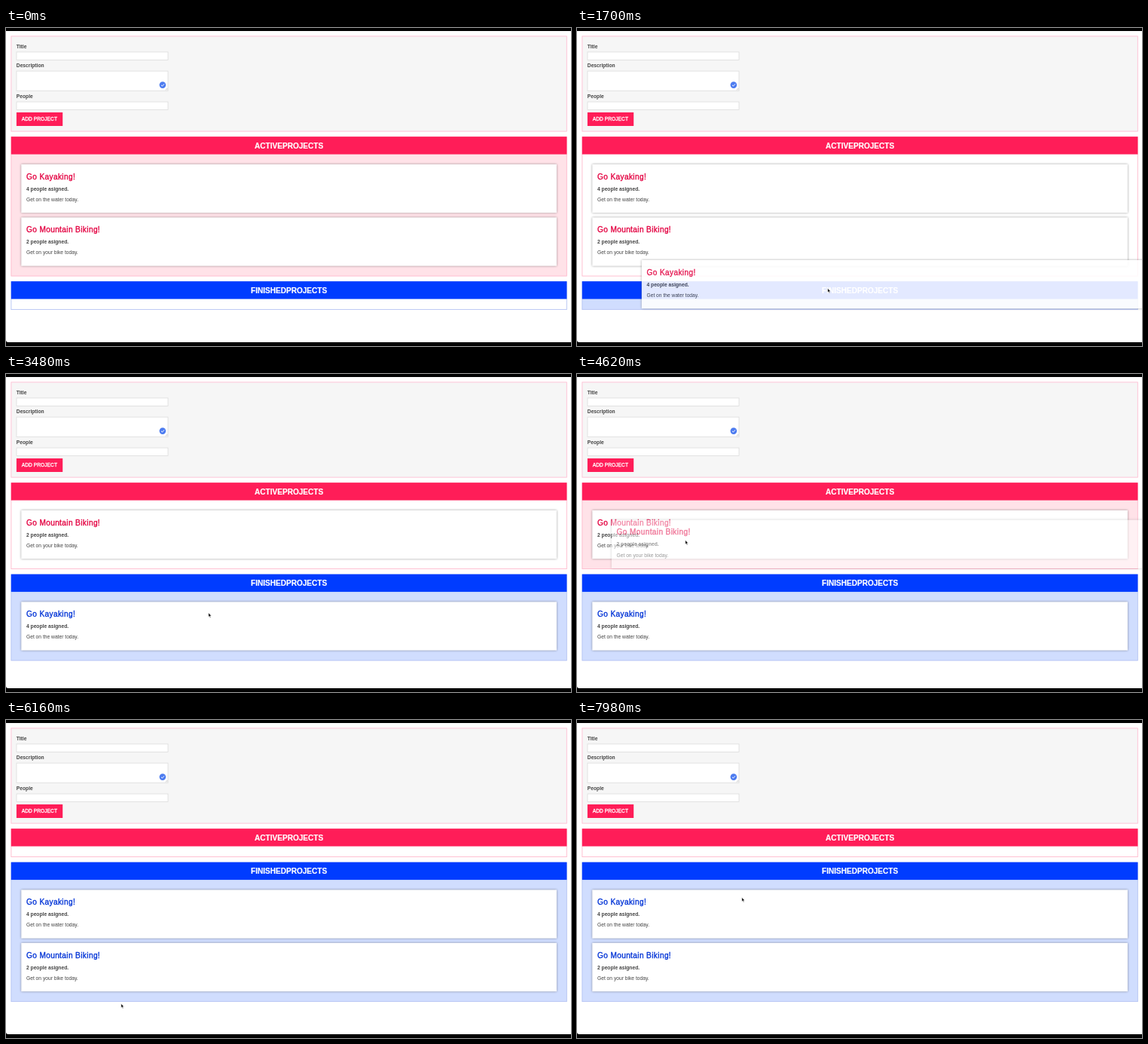
These frames come from a looping animation (750 px wide and 422 px high, 8000 ms). An HTML page:

```html
<!DOCTYPE html>
<html lang="en">
<head>
<meta charset="utf-8">
<title>Project board</title>
<style>
  html, body { margin: 0; width: 100%; height: 100%; overflow: hidden; background: #000; }
  svg { display: block; width: 100vw; height: 100vh; }
  text { font: 6.69px "Liberation Sans", Arial, sans-serif; fill: #444; }
  .bold { font-weight: bold; }
  .title { font-size: 10.06px; letter-spacing: .4px; stroke-width: .35; }
  .head { font-size: 10.06px; font-weight: bold; fill: #fff; stroke: #fff; stroke-width: .2; text-anchor: middle; }
  .button { fill: #fff; stroke: #fff; stroke-width: .3; }
  .field { fill: #fff; stroke: #dcdcdc; stroke-width: .8; }
  .card rect { fill: #fff; filter: drop-shadow(.5px .7px 1.6px rgba(0, 0, 0, .4)); }
</style>
</head>
<body>
<svg id="stage" viewBox="0 0 750 422" preserveAspectRatio="none">
  <path d="M0 4H750V417H3Q0 417 0 414Z" fill="#fff"/>
  <rect x="6.9" y="10.9" width="737.4" height="126.2" fill="#f6f6f6" stroke="#ffbfd3" stroke-width=".9"/>
  <g id="form"></g>
  <path d="M211.8 82.4L214.4 79.8M213.4 82.4L214.4 81.4" stroke="#999" stroke-width=".5"/>
  <circle cx="207.9" cy="75.6" r="4.3" fill="#4c7bf0"/>
  <path d="M205.9 75.7L207.4 77.1L210 74.3" fill="none" stroke="#fff"/>
  <rect x="13.9" y="112" width="61.3" height="18" fill="#ff1d58"/>
  <text class="button" x="20.8" y="123.3">ADD PROJECT</text>
</svg>
<script>
const LOOP = 8000;
const LEFT = 20.3, TOP = 144.2, GAP = 7.1, PITCH = 70.5, INSET = 36.7;
const RED = '#e30040', BLUE = '#0033d6';
const stage = document.getElementById('stage');

function add(parent, tag, attrs = {}, text = '') {
  const el = document.createElementNS('http://www.w3.org/2000/svg', tag);
  for (const k in attrs) el.setAttribute(k, attrs[k]);
  el.textContent = text;
  parent.appendChild(el);
  return el;
}

const move = (el, x, y) => el.setAttribute('transform', `translate(${x.toFixed(2)} ${y.toFixed(2)})`);
const show = (el, on) => el.setAttribute('visibility', on ? 'visible' : 'hidden');

function makeForm(form) {
  let y = 26.5;
  for (const [label, height] of [['Title', 10.5], ['Description', 26.2], ['People', 10.5]]) {
    add(form, 'text', { class: 'bold', x: 13.8, y }, label);
    add(form, 'rect', { class: 'field', x: 14, y: y + 5.4, width: 201, height });
    y += height + 14.7;
  }
}

function makeZone(name, strong, soft, line) {
  const g = add(stage, 'g');
  const body = add(g, 'rect', { x: 6.9, y: .4, width: 737.4, stroke: line, 'stroke-width': .9 });
  add(g, 'rect', { x: 6.8, width: 737.6, height: 23.4, fill: strong });
  add(g, 'text', { class: 'head', x: 375.6, y: 15.5 }, name);
  return { g, body, soft };
}

function makeCard(title, people, note) {
  const g = add(stage, 'g', { class: 'card' });
  add(g, 'rect', { width: 710.6, height: 64.3 });
  const h = add(g, 'text', { class: 'title', x: 6.7, y: 19.7 }, title);
  add(g, 'text', { class: 'bold', x: 6.7, y: 34.9 }, `${people} people asigned.`);
  add(g, 'text', { x: 6.7, y: 49.1 }, note);
  return { g, h };
}

function tint(card, color) {
  card.h.style.fill = card.h.style.stroke = color;
}

makeForm(document.getElementById('form'));
const active = makeZone('ACTIVEPROJECTS', '#ff1d58', '#ffe2e8', '#ffb9cc');
const finished = makeZone('FINISHEDPROJECTS', '#003cff', '#d0ddfe', '#b4c2f2');

const projects = [
  ['Go Kayaking!', 4, 'Get on the water today.'],
  ['Go Mountain Biking!', 2, 'Get on your bike today.']
];
const cards = projects.map(p => makeCard(...p));
const ghosts = projects.map(p => makeCard(...p));
ghosts.forEach(g => tint(g, RED));
const drags = [{ from: 860, to: 3060 }, { from: 4480, to: 5900 }];

const cursor = add(stage, 'path', {
  d: 'M-1.2 -3.6V1.8L0 .7L.9 2.8L1.8 2.4L.9 .4H2.6Z',
  fill: '#000', stroke: '#fff', 'stroke-width': .5
});

// Window edge stays above dragged cards
add(stage, 'rect', { y: 417, width: 750, height: 5 });

// Turning points of the pointer: time, x, y
const path = [
  [0, 296, 246], [860, 268.5, 222], [1700, 334, 349], [2560, 317, 378],
  [3060, 316, 364], [4480, 102.5, 203], [4620, 145, 224], [5320, 158, 368],
  [6160, 154, 380], [7420, 394, 270], [LOOP, 219.5, 239]
];

function slope(i, k) {
  if (i < 1 || i > path.length - 2) return 0;
  const rate = j => (path[j + 1][k] - path[j][k]) / (path[j + 1][0] - path[j][0]);
  const a = rate(i - 1), b = rate(i);
  return a * b > 0 ? 2 * a * b / (a + b) : 0;
}

// Monotone Hermite curve through the turning points
function along(t, k) {
  const i = path.findIndex(p => p[0] > t) - 1;
  const a = path[i], b = path[i + 1], w = b[0] - a[0], u = (t - a[0]) / w, v = 1 - u;
  return v * v * (1 + 2 * u) * a[k] + u * u * (3 - 2 * u) * b[k]
    + w * u * v * (v * slope(i, k) - u * slope(i + 1, k));
}

const pointer = t => ({ x: along(t, 1), y: along(t, 2) });
const zoneHeight = count => count ? 43.9 + count * PITCH : 37.4;

function placeZone(zone, y, height, hot) {
  move(zone.g, 0, y);
  zone.body.setAttribute('height', height - .4);
  zone.body.setAttribute('fill', hot ? zone.soft : '#fff');
}

function draw(t) {
  const p = pointer(t);
  const done = drags.filter(d => t >= d.to).length;
  const dragging = drags.some(d => t >= d.from && t < d.to);

  const h1 = zoneHeight(cards.length - done), h2 = zoneHeight(done);
  const second = TOP + h1 + GAP;
  const over = (y, h) => dragging && p.y >= y && p.y < y + h;
  placeZone(active, TOP, h1, t < drags[0].from || over(TOP, h1));
  placeZone(finished, second, h2, done > 0 || over(second, h2));

  cards.forEach((card, i) => {
    const moved = i < done;
    const row = moved ? i : i - done;
    move(card.g, LEFT, (moved ? second : TOP) + INSET + row * PITCH);
    tint(card, moved ? BLUE : RED);
  });

  // A lifted card fades in while it catches up with the pointer
  drags.forEach((d, i) => {
    const g = ghosts[i].g, grip = pointer(d.from);
    const grow = Math.min(1, (t - d.from) / 235);
    show(g, t >= d.from && t < d.to);
    move(g, LEFT + (p.x - grip.x) * grow, TOP + INSET + (p.y - grip.y) * grow);
    g.setAttribute('opacity', Math.max(0, .89 * grow));
  });

  show(cursor, t >= 40);
  move(cursor, p.x, p.y);
}

function tick() {
  draw(performance.now() % LOOP);
  requestAnimationFrame(tick);
}
tick();
</script>
</body>
</html>
```
